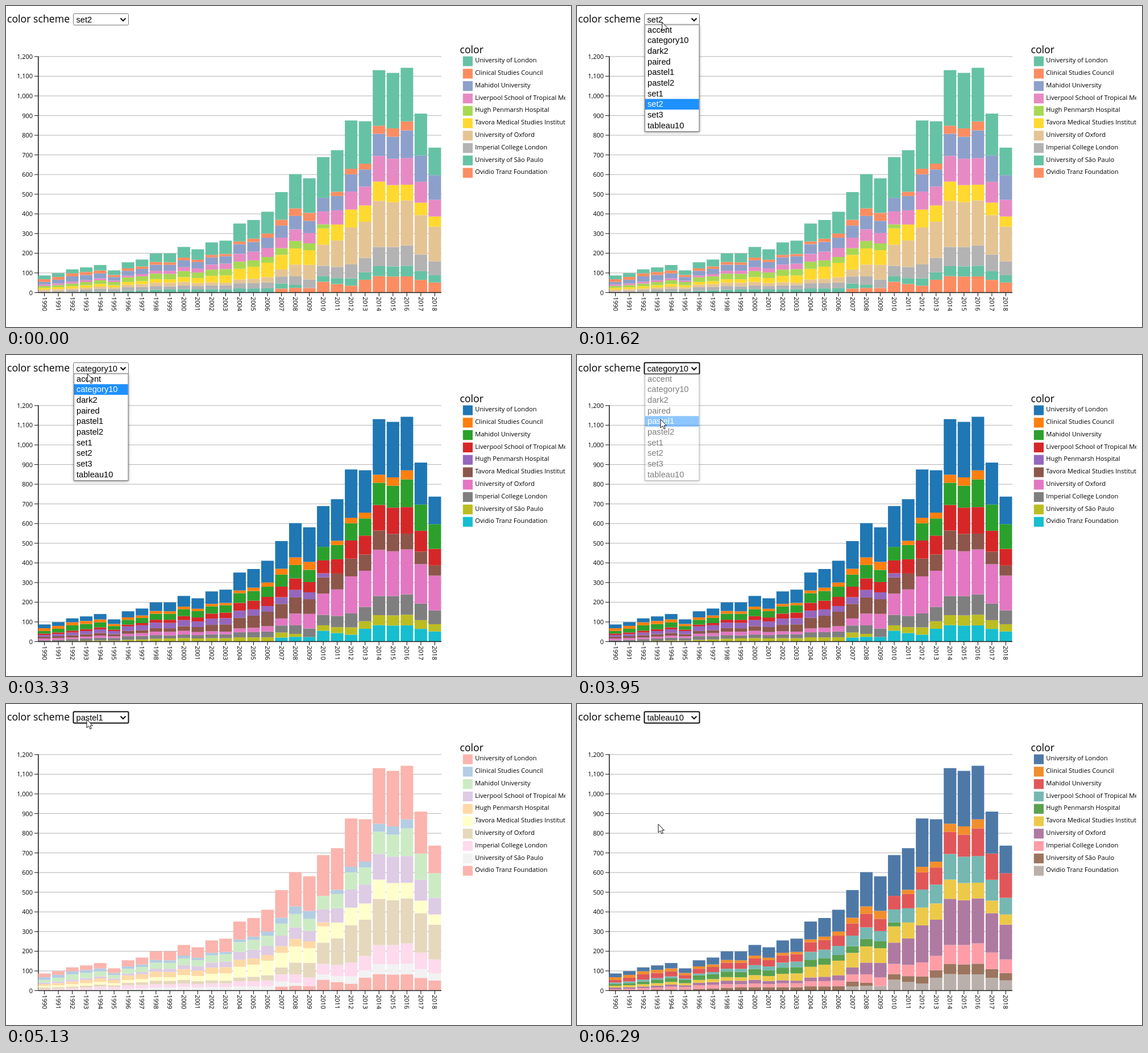
An HTML page for the animation above (7220 ms loop, 994 by 564 pixels).

```html
<!DOCTYPE html>
<html lang="en">
<head>
<meta charset="utf-8">
<title>Stacked bars by colour scheme</title>
<style>
  html, body { margin: 0; width: 100%; height: 100%; overflow: hidden; background: #fff; }
  svg { display: block; width: 994px; height: 564px; font: 11px "Open Sans", "Noto Sans", sans-serif; }
  .big { font-size: 17.7px; }
  .key { font-size: 11.2px; }
  .ui text { font: 14.67px "Liberation Sans", Arial, sans-serif; }
  #popup { filter: drop-shadow(0 1px 2px #0007); }
</style>
</head>
<body>
<svg id="stage" viewBox="0 0 994 564">
  <defs><clipPath id="edge"><rect width="984" height="564"/></clipPath></defs>
  <text class="big" x="2" y="28.5">color scheme</text>
  <text class="big" x="798.5" y="83">color</text>
  <g id="chart"></g>
  <g id="legend" clip-path="url(#edge)"></g>
  <g class="ui">
    <rect id="box" x="118.5" y="13.5" width="97" height="20" rx="2" fill="#fff"/>
    <text id="label" x="123.5" y="28.7"></text>
    <path d="M201.5 21.5L206 26L210.5 21.5" fill="none" stroke="#111" stroke-width="2"/>
    <g id="popup">
      <rect x="119.5" y="33" width="95.5" height="187.5" fill="#fff" stroke="#767676"/>
      <rect id="mark" x="120" width="94.6" height="18.67" fill="#1e90ff"/>
    </g>
  </g>
  <path id="cursor" d="M0 0V15L3.5 11.7L6 17L8.3 16L6 11H10.5Z" fill="#fff" stroke="#111"/>
</svg>
<script>
const LOOP = 7220, ROW = 18.67, LIST_TOP = 32.6, FIRST_YEAR = 1990;
const get = id => document.getElementById(id);
const colors = s => s.split(' ').map(c => '#' + c);

const palettes = {
  set2: colors('66c2a5 fc8d62 8da0cb e78ac3 a6d854 ffd92f e5c494 b3b3b3'),
  category10: colors('1f77b4 ff7f0e 2ca02c d62728 9467bd 8c564b e377c2 7f7f7f bcbd22 17becf'),
  pastel1: colors('fbb4ae b3cde3 ccebc5 decbe4 fed9a6 ffffcc e5d8bd fddaec f2f2f2'),
  tableau10: colors('4e79a7 f28e2c e15759 76b7b2 59a14f edc949 af7aa1 ff9da7 9c755f bab0ab')
};
const options = ['accent', 'category10', 'dark2', 'paired', 'pastel1',
  'pastel2', 'set1', 'set2', 'set3', 'tableau10'];

const totals = [87, 99, 118, 128, 140, 113, 154, 168, 199, 199, 232, 220, 255, 264, 351,
  369, 411, 511, 602, 581, 689, 724, 875, 871, 1131, 1117, 1143, 910, 737];

// Percent of the yearly total at turning points; the first group takes the rest.
const groups = [
  ['University of London'],
  ['Clinical Studies Council', { 1990: 16, 1996: 8, 2004: 4, 2009: 7, 2010: 0, 2011: 3, 2016: 4, 2017: 0 }],
  ['Mahidol University', { 1990: 15, 1992: 23, 1995: 16, 2004: 14, 2010: 10, 2015: 10, 2018: 17 }],
  ['Liverpool School of Tropical Medicine', { 1990: 9, 1996: 6, 2005: 12, 2009: 9, 2015: 12, 2018: 11.5 }],
  ['Hugh Penmarsh Hospital', { 1990: 10, 1996: 15, 2003: 12, 2006: 7, 2009: 6, 2011: 0 }],
  ['Tavora Medical Studies Institute', { 1990: 10, 1999: 9, 2006: 18, 2007: 14.5, 2016: 7 }],
  ['University of Oxford', { 1990: 11, 1992: 7, 1999: 9, 2003: 5, 2007: 7, 2012: 21.5, 2016: 20, 2018: 24 }],
  ['Imperial College London', { 1990: 6, 1996: 12, 1999: 8, 2007: 7, 2018: 9.5 }],
  ['University of São Paulo', { 1990: 1, 1999: 8, 2007: 5, 2009: 0, 2010: 4, 2018: 5 }],
  ['Ovidio Tranz Foundation', { 2006: 0, 2007: 4, 2009: 4, 2010: 8, 2012: 4, 2013: 7.5, 2018: 7 }]
];

function valueAt(points, year) {
  const years = Object.keys(points).map(Number);
  const a = years.filter(y => y <= year).pop() ?? years[0];
  const b = years.find(y => y > year) ?? a;
  const p = b > a ? (year - a) / (b - a) : 0;
  return points[a] + (points[b] - points[a]) * p;
}

function add(parent, tag, attrs, text = '') {
  const el = document.createElementNS('http://www.w3.org/2000/svg', tag);
  for (const k in attrs) el.setAttribute(k, attrs[k]);
  el.textContent = text;
  return parent.appendChild(el);
}

const painted = groups.map(() => []);
const yOf = v => 503.5 - v * 0.34555;
const chart = get('chart');
const rule = (d, width, stroke = '#222') => add(chart, 'path', { d, stroke, 'stroke-width': width });

for (let v = 0; v <= 1200; v += 100) {
  const y = yOf(v);
  rule(`M57 ${y}H766`, 1, '#b4b4b4');
  rule(`M50 ${y}H57`, 1.1);
  add(chart, 'text', { x: 47, y: y + 4, 'text-anchor': 'end' }, v.toLocaleString('en-US'));
}
rule('M56.8 88.5V503.5', 1.6);

totals.forEach((total, i) => {
  const x = 56.5 + i * 24.53, mid = x + 11.04, year = FIRST_YEAR + i;
  let base = 0;
  for (let k = groups.length - 1; k >= 0; k--) {
    const top = k ? base + total * valueAt(groups[k][1], year) / 100 : total;
    if (top > base) painted[k].push(add(chart, 'rect',
      { x, y: yOf(top), width: 22.08, height: yOf(base) - yOf(top) }));
    base = top;
  }
  rule(`M${mid} 504V510`, 1.1);
  add(chart, 'text', { transform: `translate(${mid - 4} 511)rotate(90)` }, year);
});
rule('M56 503.5H766', 1.4);

groups.forEach(([name], i) => {
  const y = 88.5 + i * 21.78;
  painted[i].push(add(get('legend'), 'rect', { x: 803.8, y, width: 17.2, height: 17.2 }));
  add(get('legend'), 'text', { class: 'key', x: 825.3, y: y + 10.8 }, name);
});
const items = options.map((name, i) =>
  add(get('popup'), 'text', { x: 124, y: LIST_TOP + i * ROW + 14 }, name));

const choices = [[0, 'set2'], [2230, 'category10'], [4040, 'pastel1'], [6290, 'tableau10']];
// fade in, fully open, fade out, closed
const openings = [[920, 990, 2230, 2230], [2930, 3010, 3950, 4040], [5210, 5280, 6290, 6290]];
// first step, last step, step count, from, to
const moves = [
  [370, 760, 6, [150, 46], [150, 22]],
  [1620, 1770, 3, [150, 22], [149, 54]],
  [2080, 2080, 1, [149, 54], [150, 52.5]],
  [2540, 2850, 5, [150, 52.5], [143, 28]],
  [3330, 3640, 5, [143, 28], [147, 113]],
  [4730, 5130, 6, [147, 113], [142, 27]],
  [5520, 5910, 6, [142, 27], [143, 231]],
  [5985, 6140, 3, [143, 231], [143, 211]]
];
const ease = p => p * p * p * (p * (6 * p - 15) + 10);

function cursorAt(t) {
  const move = moves.filter(m => m[0] <= t).pop();
  if (!move) return null;
  const [start, end, steps, from, to] = move;
  const step = t >= end ? steps : 1 + Math.floor((t - start) / (end - start) * (steps - 1) + 1e-6);
  const p = ease(step / steps);
  return from.map((v, i) => v + (to[i] - v) * p);
}

function popupAlpha(t) {
  const o = openings.find(o => t >= o[0] && t < o[3]);
  return !o ? 0 : t < o[1] || t >= o[2] ? 0.5 : 1;
}

let shown;
function paint(scheme) {
  if (scheme === shown) return;
  shown = scheme;
  const palette = palettes[scheme];
  painted.forEach((rects, i) =>
    rects.forEach(r => r.setAttribute('fill', palette[i % palette.length])));
  get('label').textContent = scheme;
}

function draw(t) {
  const scheme = choices.filter(c => c[0] <= t).pop()[1];
  paint(scheme);

  const pos = cursorAt(t), cursor = get('cursor');
  cursor.style.display = pos ? '' : 'none';
  if (pos) cursor.setAttribute('transform', `translate(${pos})`);

  const alpha = popupAlpha(t), focused = t >= 920 && alpha < 1;
  get('popup').style.display = alpha ? '' : 'none';
  get('popup').style.opacity = alpha;
  get('box').setAttribute('stroke', focused ? '#101010' : '#767676');
  get('box').setAttribute('stroke-width', focused ? 2 : 1);

  const hot = pos && pos[1] > 37
    ? Math.min(9, Math.floor((pos[1] - LIST_TOP) / ROW)) : options.indexOf(scheme);
  get('mark').setAttribute('y', LIST_TOP + hot * ROW);
  items.forEach((el, i) => el.setAttribute('fill', i === hot ? '#fff' : '#000'));
}

const begin = performance.now();
function tick() {
  draw((performance.now() - begin) % LOOP);
  requestAnimationFrame(tick);
}
tick();
</script>
</body>
</html>
```
